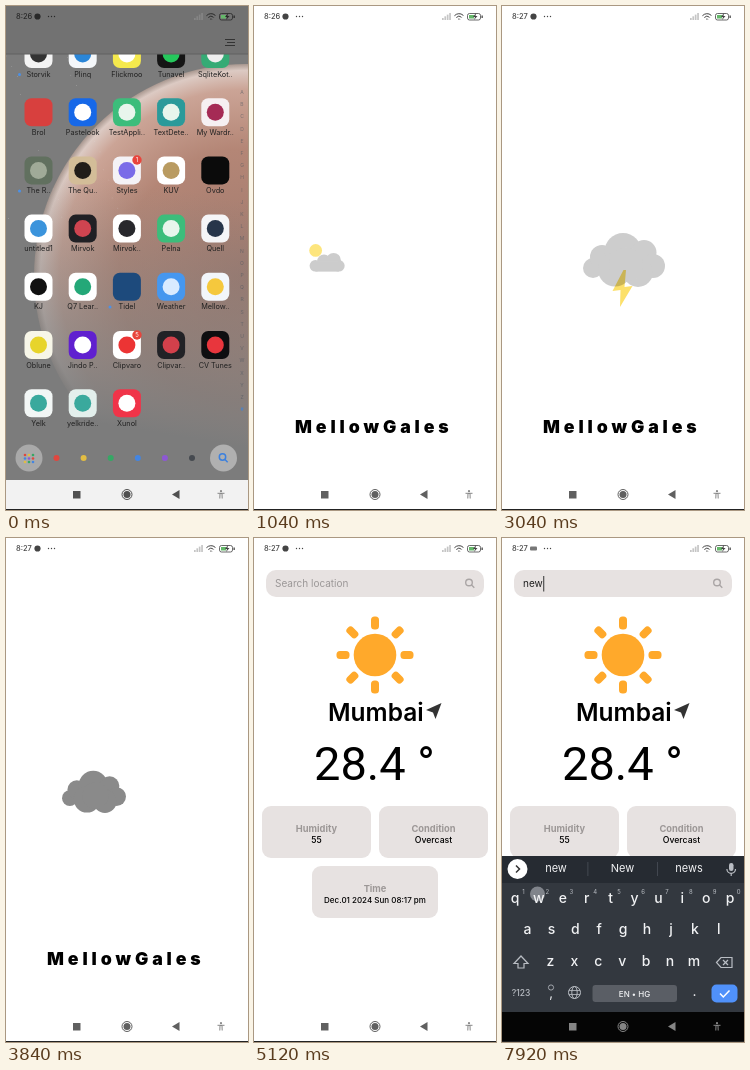
Recreate the animation shown at these times as an HTML page with a canvas. Size 242 px wide and 504 px high, loop 8000 ms.

```html
<!DOCTYPE html>
<html lang="en">
<head>
<meta charset="utf-8">
<title>Weather app</title>
<style>
html, body { margin: 0; width: 100%; height: 100%; overflow: hidden; background: #fff; }
canvas { display: block; width: 242px; height: 504px; }
</style>
</head>
<body>
<canvas id="stage"></canvas>
<script>
const W = 242, H = 504, LOOP = 8000, TAU = Math.PI * 2;
const canvas = document.getElementById('stage');
const c = canvas.getContext('2d');
const dpr = window.devicePixelRatio || 1;
canvas.width = W * dpr;
canvas.height = H * dpr;

const clamp = v => Math.max(0, Math.min(1, v));
const lerp = (a, b, p) => a + (b - a) * p;
const span = (t, a, b) => clamp((t - a) / (b - a));
const easeOut = p => 1 - (1 - p) ** 3;
const smooth = p => p * p * (3 - 2 * p);
const grey = v => `rgb(${v},${v},${v})`;

function rect(x, y, w, h, fill, r = 0) {
  c.fillStyle = fill;
  c.beginPath();
  c.roundRect(x, y, w, h, r);
  c.fill();
}
function disc(x, y, r, fill) {
  c.fillStyle = fill;
  c.beginPath();
  c.arc(x, y, r, 0, TAU);
  c.fill();
}
function ring(x, y, r, color, w = 1) {
  c.strokeStyle = color;
  c.lineWidth = w;
  c.beginPath();
  c.arc(x, y, r, 0, TAU);
  c.stroke();
}
function poly(pts, fill) {
  c.fillStyle = fill;
  c.beginPath();
  pts.forEach(([x, y]) => c.lineTo(x, y));
  c.closePath();
  c.fill();
}
function line(pts, color, w = 1, close = false) {
  c.strokeStyle = color;
  c.lineWidth = w;
  c.beginPath();
  pts.forEach(([x, y]) => c.lineTo(x, y));
  if (close) c.closePath();
  c.stroke();
}
function text(s, x, y, size, color, weight = 400, align = 'center', family = 'Inter') {
  c.font = `${weight} ${size}px ${family}, sans-serif`;
  c.textAlign = align;
  c.fillStyle = color;
  c.fillText(s, x, y);
}
function magnifier(x, y, r, color, w) {
  ring(x - 1, y - 1, r, color, w);
  line([[x - 1 + r * .7, y - 1 + r * .7], [x + r * 1.3, y + r * 1.3]], color, w);
}

// System bars
function statusBar(t, ink) {
  text(t < 2240 ? '8:26' : '8:27', 10, 13.2, 7.5, ink, 500, 'left');
  if (t > 7040) rect(28, 8.5, 7, 4, '#777', 1);
  else disc(31.5, 10.5, 3.1, ink);
  for (let i = 0; i < 3; i++) disc(42.5 + i * 3, 10.5, .7, ink);
  for (let i = 0; i < 4; i++) rect(188 + i * 2.4, 12 - i * 1.7, 1.7, 2 + i * 1.7, 'rgba(150,150,150,.55)');
  c.lineCap = 'round';
  c.strokeStyle = ink;
  c.lineWidth = 1;
  for (let i = 0; i < 3; i++) {
    c.beginPath();
    c.arc(205, 13.5, .7 + i * 2.6, -Math.PI * .76, -Math.PI * .24);
    c.stroke();
  }
  c.lineCap = 'butt';
  c.lineWidth = .8;
  c.beginPath();
  c.roundRect(213.5, 7.5, 13, 6.5, 2);
  c.stroke();
  rect(215, 9, 5, 3.5, '#65b86a');
  poly([[222, 7], [219, 11], [221, 11], [220, 14], [223.5, 10], [221.5, 10]], ink);
  rect(227.5, 9.5, 1.3, 2.5, ink);
}
function navIcons(ink) {
  rect(67, 485, 7.5, 7.5, ink);
  ring(121, 488.5, 5, ink, 1);
  disc(121, 488.5, 3.5, ink);
  poly([[166, 488.5], [173.5, 484], [173.5, 493]], ink);
  disc(215, 485.2, 1.1, '#888');
  line([[211.5, 487.3], [218.5, 487.3]], '#888');
  line([[213.8, 492.5], [214, 487.5], [216, 487.5], [216.2, 492.5]], '#888');
  rect(0, 503, W, 1, '#222');
}

// Home screen: label, tile colour, circle colour
const apps = [
  [['Storvik', '#f4f4f4', '#333'], ['Plinq', '#f4f7fa', '#2a86d8'], ['Flickmoo', '#f5e94d', '#fff'], ['Tunavel', '#151515', '#25c85c'], ['SqliteKot..', '#35ab75', '#eee']],
  [['Brol', '#d8403e'], ['Pastelook', '#1668e8', '#fff'], ['TestAppli..', '#3cbd7b', '#e8f5ec'], ['TextDete..', '#2b9a9a', '#e8f5ec'], ['My Wardr..', '#f6f0f2', '#a52b55']],
  [['The R..', '#61705f', '#a0aa98'], ['The Qu..', '#d3bd98', '#211d19'], ['Styles', '#f4f2f6', '#7a6be8'], ['KUV', '#fff', '#b99b61'], ['Ovdo', '#0b0b0b']],
  [['untitled1', '#fff', '#3b94dc'], ['Mirvok', '#202024', '#cf4450'], ['Mirvok..', '#fff', '#28282c'], ['Pelna', '#3cbd7b', '#e8f5ec'], ['Quell', '#f5f5f7', '#27354a']],
  [['KJ', '#fff', '#111'], ['Q7 Lear..', '#fff', '#24a878'], ['Tidel', '#1d4a7c'], ['Weather', '#4597ef', '#d9ebff'], ['Mellow..', '#f2f6fb', '#f5c83d']],
  [['Oblune', '#f7f6e8', '#e7d42b'], ['Jindo P..', '#6020cf', '#fff'], ['Clipvaro', '#fff', '#ec3434'], ['Clipvar..', '#222226', '#d3404b'], ['CV Tunes', '#0e0e10', '#e8363d']],
  [['Yelk', '#f2f6f5', '#3aa99d'], ['yelkride..', '#e3efec', '#3aa99d'], ['Xunol', '#f03449', '#fff']]
];
const colX = i => 32.5 + i * 44.2;
const rowY = j => 48 + j * 58.2;

function wallpaper() {
  rect(0, 0, W, H, '#7c7c7c');
  const g = c.createRadialGradient(240, 270, 0, 240, 270, 212);
  g.addColorStop(0, '#a07a6e');
  g.addColorStop(.6, '#b48676');
  g.addColorStop(.88, '#cba496');
  g.addColorStop(.97, '#dccac3');
  g.addColorStop(1, '#a8978f');
  disc(240, 270, 212, g);
  const fade = c.createLinearGradient(150, 180, 110, 420);
  fade.addColorStop(0, 'rgba(124,124,124,0)');
  fade.addColorStop(1, 'rgba(124,124,124,1)');
  rect(0, 0, W, H, fade);
  for (let i = 0; i < 26; i++) {
    disc(i * 73.7 % 115, 50 + i * 47.3 % 170, .4, 'rgba(225,225,225,.55)');
  }
}
function home() {
  wallpaper();
  c.save();
  c.beginPath();
  c.rect(0, 48, W, H);
  c.clip();
  apps.forEach((row, j) => row.forEach(([name, tile, dot], i) => {
    const x = colX(i), y = rowY(j);
    rect(x - 14, y - 14, 28, 28, tile, 7);
    if (dot) disc(x, y, 8.5, dot);
    text(name, x, y + 22.5, 7.3, '#222');
  }));
  [[13.5, 68.5], [13.5, 185], [104, 301]].forEach(([x, y]) => disc(x, y, 1.5, '#4b91e8'));
  [[154, 1], [329, 5]].forEach(([y, n]) => {
    disc(131, y, 4.7, '#e8443c');
    text(n, 131, y + 2.3, 6, '#fff');
  });
  c.restore();
  rect(0, 0, W, 48, '#727272');
  rect(0, 47.5, W, 1, '#606060');
  line([[219, 33.5], [229, 33.5]], '#333');
  line([[221, 36.5], [229, 36.5]], '#333');
  line([[219, 39.5], [229, 39.5]], '#333');
  [...'ABCDEFGHIJKLMNOPQRSTUVWXYZ'].forEach((ch, i) => text(ch, 236, 88 + i * 12.2, 5, 'rgba(75,85,95,.6)'));
  text('#', 236, 405, 5, '#3c83dc');

  disc(23, 452, 13.5, '#a9a9a9');
  const dots = ['#e0473f', '#e2bd43', '#36a765', '#4385e2', '#8d58d3', '#464a50'];
  for (let i = 0; i < 9; i++) disc(19 + i % 3 * 4, 449 + Math.floor(i / 3) * 3.5, 1.3, dots[i % 5]);
  dots.forEach((color, i) => disc(50.5 + i * 27.1, 452, 3, color));
  disc(217.5, 452, 13.5, '#b0b0b0');
  magnifier(217.5, 452, 3.2, '#3c80de', 1.5);
  rect(0, 474, W, 30, '#f2f2f2');
}
function launch(t) {
  home();
  const p = easeOut(span(t, 160, 610));
  rect(0, 0, W, H, `rgba(0,0,0,${.34 * clamp(p * 1.4)})`);
  if (t > 160) {
    const x = lerp(195, 0, p), y = lerp(266, 0, p);
    rect(x, y, lerp(223, W, p) - x, lerp(294, H, p) - y, t < 840 ? '#fdf7fe' : '#fff', 8 * (1 - p) ** 2);
  }
  statusBar(t, '#292929');
  navIcons('#505050');
}

// Splash
const puffs = [[-31, 8.5, 10], [-22, -2.5, 12], [-1, -8, 18.5], [20, -7, 12.5], [29, 6.5, 12], [14, 12.5, 15], [-9, 10, 17], [2, 5, 17]];
function stormCloud(x, scale, shade) {
  puffs.forEach(([dx, dy, r]) => disc(x + dx * scale, 253.5 + dy * scale, r * scale, grey(shade)));
}
function sunnyCloud(t) {
  const p = smooth(span(t, 880, 1200)) * (1 - smooth(span(t, 1960, 2360)));
  if (!p) return;
  c.save();
  c.translate(73, 253);
  c.scale(p, p);
  c.translate(-73, -253);
  disc(50.5, 236, 12.7, '#fde57d');
  [[50, 266.5, 11.5], [67, 257.5, 13.5], [86, 255.5, 14.5], [96.5, 266.5, 11.5]].forEach(d => disc(...d, '#ccc'));
  rect(50, 258, 46.5, 20, '#ccc');
  c.restore();
}
function splash(t) {
  rect(0, 0, W, H, '#fff');
  if (t < 960) return;
  sunnyCloud(t);
  const enter = smooth(span(t, 1400, 1840));
  const join = smooth(span(t, 2000, 2600));
  const leave = smooth(span(t, 3520, 3840));
  if (enter) {
    const x = lerp(lerp(171.5, 122, join), 88, leave);
    const scale = lerp(lerp(.89 * enter, 1, join), .78, leave);
    stormCloud(x, scale, Math.round(lerp(lerp(127, 205, join), 138, leave)));
  }
  const bolt = span(t, 2560, 2800) * (1 - span(t, 3360, 3520));
  if (bolt) {
    c.save();
    c.globalAlpha = bolt;
    c.globalCompositeOperation = 'multiply';
    poly([[121.5, 264], [110.5, 285], [118.5, 284], [118, 301], [130.5, 280], [122.5, 281], [124, 264]], '#fce06a');
    c.restore();
  }
  c.letterSpacing = '3.9px';
  text('MellowGales', 41, 427, 17.7, '#000', 900, 'left');
  c.letterSpacing = '0px';
}

// Weather page
function typed(t) {
  return 'new'.slice(0, (t >= 7040) + (t >= 7280) + (t >= 7840));
}
function card(x, y, w, title, value, size = 8.7) {
  rect(x, y, w, 52, '#e7e2e1', 9);
  text(title, x + w / 2, y + 25.5, 9.3, '#9c9796', 700);
  text(value, x + w / 2, y + 37, size, '#000', 500);
}
function page(t) {
  rect(0, 0, W, H, '#fff');
  rect(12, 32, 218, 27, '#e7e2e1', 10);
  const query = typed(t);
  text(query || 'Search location', 21, 48.5, 10, query ? '#222' : '#9b9797', 400, 'left');
  const end = 21.5 + (query ? c.measureText(query).width : 0);
  if (t > 5840 && t < 6400 || t >= 7040) rect(end, 38, 1, 15.5, '#333');
  magnifier(216, 45.5, 3.3, '#aaa5a5', 1.4);

  disc(121, 117, 21.3, '#ffa92b');
  for (let i = 0; i < 8; i++) {
    c.save();
    c.translate(121, 117);
    c.rotate(i * TAU / 8);
    rect(25.5, -4, 13, 8, '#ffa92b', 3.5);
    c.restore();
  }
  text('Mumbai', 74, 183, 24.5, '#000', 600, 'left');
  poly([[187.5, 165], [172, 172], [179, 174.5], [181.5, 181]], '#333');
  text('28.4 °', 60, 242, 47, '#000', 400, 'left', 'Roboto');
  card(8, 268, 109, 'Humidity', '55');
  card(125, 268, 109, 'Condition', 'Overcast');
  card(58, 328, 126, 'Time', 'Dec.01 2024 Sun 08:17 pm', 8);
}

// Keyboard
const keyInk = '#f1f2f4', iconInk = '#b9bdc3';
function letters(row, x, y) {
  [...row].forEach((ch, i) => text(ch, x + i * 23.9, y, 14, keyInk, 500));
}
function suggestions(query) {
  if (!query) {
    rect(83, 321.5, 81, 20, '#737780', 4);
    rect(84, 322.5, 79, 18, '#3a3f48', 3);
    rect(90, 327, 8, 9, '#5595ff', 1);
    rect(92, 325.5, 4, 3, '#5595ff', 1);
    line([[92, 330.5], [96, 330.5]], '#2b3038');
    line([[92, 333], [96, 333]], '#2b3038');
    text('MellowGales', 102, 334.3, 8.6, keyInk, 500, 'left');
    return;
  }
  const title = query[0].toUpperCase() + query.slice(1);
  const next = ['no', 'new', 'news'][query.length - 1];
  [query, title, next].forEach((s, i) => text(s, 54 + i * 66.5, 334, 11, keyInk));
  [85.5, 155].forEach(x => rect(x, 324, .8, 14, '#4b5058'));
}
function touchPoint(t) {
  if (t >= 6800 && t < 7040) return [167, 423];
  if (t >= 7200 && t < 7440) return [66, 361];
  return t >= 7680 ? [35.5, 356] : null;
}
function keyboard(t) {
  const p = easeOut(span(t, 5520, 5840));
  if (!p) return;
  c.save();
  c.translate(0, 186 * (1 - p));
  rect(0, 318, W, 186, '#33383f');
  rect(0, 318, W, 27, '#262b32');
  disc(15.5, 331, 10, '#fff');
  line([[14, 327.5], [17.5, 331], [14, 334.5]], '#333', 1.5);
  suggestions(typed(t));
  rect(227, 325, 4.5, 8, iconInk, 2.2);
  c.strokeStyle = iconInk;
  c.lineWidth = 1.2;
  c.beginPath();
  c.arc(229.2, 331, 4.3, 0, Math.PI);
  c.stroke();
  line([[229.2, 335.3], [229.2, 338]], iconInk, 1.2);

  const touch = touchPoint(t);
  if (touch) disc(...touch, 7.5, 'rgba(170,174,180,.65)');
  letters('qwertyuiop', 13, 365);
  [...'1234567890'].forEach((ch, i) => text(ch, 21.5 + i * 23.9, 355.5, 6, iconInk));
  letters('asdfghjkl', 25.5, 396);
  letters('zxcvbnm', 48.5, 427.5);

  line([[19, 418], [26, 425.5], [22, 425.5], [22, 430], [16, 430], [16, 425.5], [12, 425.5]], iconInk, 1.2, true);
  line([[214.5, 424.5], [219, 419.5], [230, 419.5], [230, 429.5], [219, 429.5]], iconInk, 1.2, true);
  line([[221, 422], [226, 427]], iconInk, 1.2);
  line([[226, 422], [221, 427]], iconInk, 1.2);

  text('?123', 19, 457.5, 8.5, iconInk, 500);
  ring(49, 449.5, 2.6, iconInk, .8);
  text(',', 49, 460, 13, keyInk);
  ring(72.5, 454.5, 6, iconInk, 1);
  c.beginPath();
  c.ellipse(72.5, 454.5, 2.7, 6, 0, 0, TAU);
  c.stroke();
  line([[67, 452.5], [78, 452.5]], iconInk, .8);
  line([[67, 456.5], [78, 456.5]], iconInk, .8);
  rect(90.5, 447, 84.5, 17, '#5a5e65', 3);
  text('EN • HG', 132.5, 458.5, 8, keyInk, 500);
  text('.', 192.5, 458, 14, keyInk);
  rect(209.5, 446.5, 26, 18, '#5091fa', 5);
  line([[218, 455.5], [221.3, 459], [227.5, 452.5]], '#fff', 1.5);
  rect(0, 474, W, 30, '#050505');
  c.restore();
}

function app(t) {
  const p = easeOut(span(t, 4080, 4720));
  if (p < 1) {
    c.save();
    c.translate(-W / 4 * p, 0);
    splash(t);
    c.restore();
    rect(0, 0, W, H, `rgba(0,0,0,${.52 * p})`);
  }
  if (p > 0) {
    c.save();
    c.translate(W * (1 - p), 0);
    page(t);
    c.restore();
  }
  keyboard(t);
  statusBar(t, '#444');
  navIcons(t > 5600 ? '#858585' : '#606060');
}

const start = performance.now();
function draw() {
  const t = (performance.now() - start) % LOOP;
  c.setTransform(dpr, 0, 0, dpr, 0, 0);
  if (t < 880) launch(t);
  else app(t);
  requestAnimationFrame(draw);
}
draw();
</script>
</body>
</html>
```
